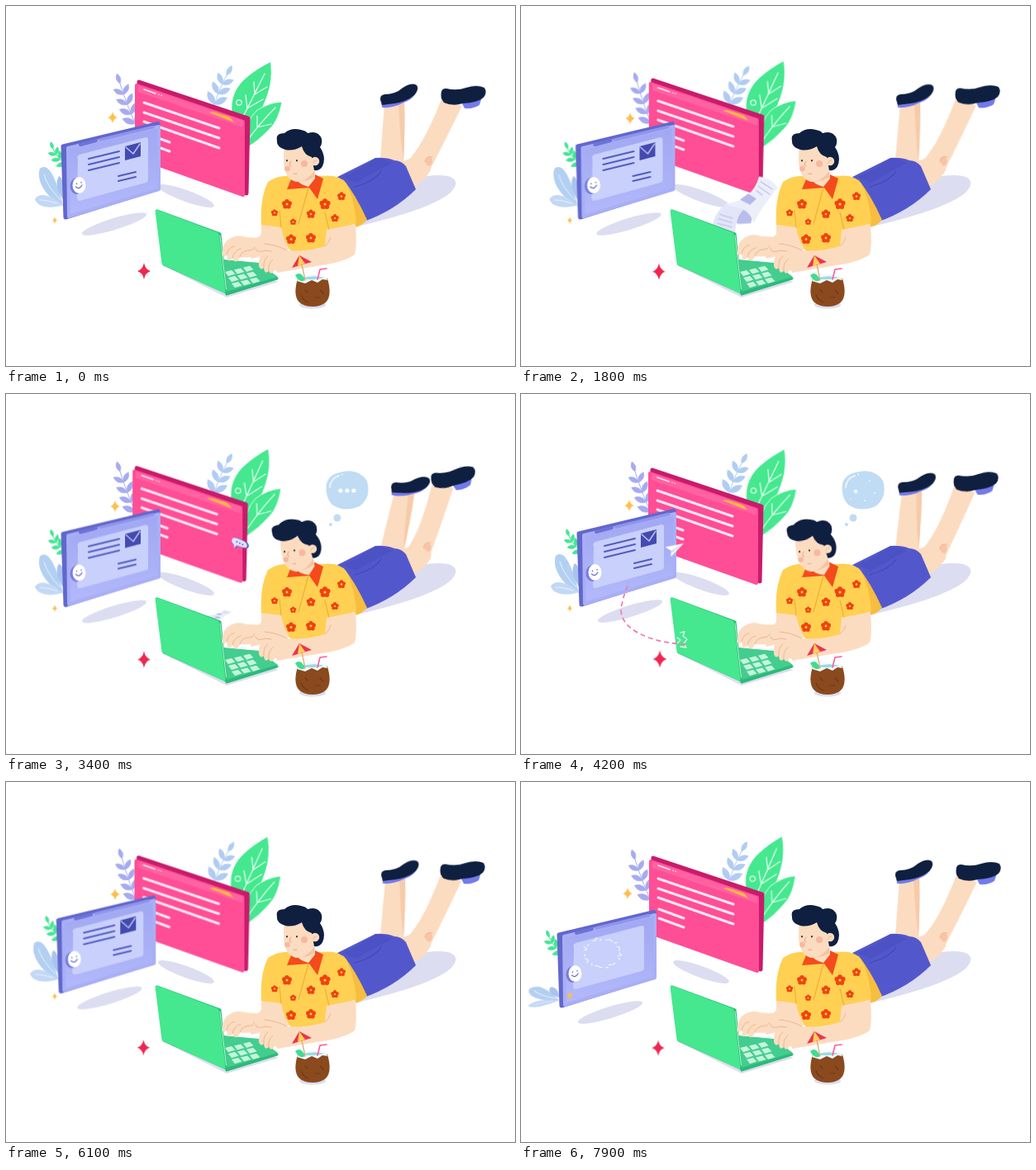
Recreate the animation shown at these times as an HTML page. Size 616 px wide and 436 px high, loop 8000 ms.

```html
<!DOCTYPE html>
<html lang="en">
<head>
<meta charset="utf-8">
<title>Working on the floor</title>
<style>
html, body { margin: 0; width: 100%; height: 100%; overflow: hidden; background: #fff; }
svg { display: block; width: 616px; height: 436px; }
.a { animation: 8s ease-in-out infinite; }

/* legs */
.leg { animation: 1s cubic-bezier(.37, 0, .63, 1) -50ms infinite alternate; }
#legBack { transform-origin: 465px 190px; animation-name: kickBack; }
#legFront { transform-origin: 492px 198px; animation-name: kickFront; }
@keyframes kickBack { to { transform: rotate(17deg); } }
@keyframes kickFront { to { transform: rotate(-13deg); } }

/* head and hands */
#head { transform-origin: 357px 212px; animation-name: nod; }
@keyframes nod {
  0%, 24%, 62%, 100% { transform: none; }
  29%, 57% { transform: translate(0, 1.5px) rotate(-7deg); }
}
#handA { animation: tap .2s ease-in-out infinite alternate; }
@keyframes tap { to { transform: translateY(-1.2px); } }
#handB { transform-origin: 334px 308px; animation-name: lift; }
@keyframes lift {
  0%, 29%, 36%, 100% { transform: none; }
  31.5%, 33.5% { transform: translate(7px, -2px) rotate(14deg); }
}

/* panels */
#pink { animation-name: pink; }
@keyframes pink {
  0%, 5% { transform: none; }
  11.25% { transform: translate(1px, -1px); }
  32.5%, 38% { transform: translate(-3px, -3px); }
  52.5% { transform: translate(-2px, 0); }
  66.25% { transform: translate(0, -1px); }
  86.25%, 100% { transform: translate(-1px, 0); }
}
#blue { animation-name: blue; }
@keyframes blue {
  0%, 11.25% { transform: none; }
  32.5% { transform: translate(-1px, 0); }
  52.5% { transform: translate(1px, -1px); }
  64% { transform: none; }
  66.25%, 70% { transform: translate(-6px, -4px); }
  86.25% { transform: translate(-5px, 1px); }
  91% { transform: translate(-26px, 16px); }
  95%, 100% { transform: translate(-23px, 15px); }
}
#plant { transform-origin: 68px 240px; animation-name: plant; }
@keyframes plant {
  0%, 64%, 82% { transform: none; }
  68% { transform: rotate(-5deg); }
  87% { transform: rotate(-8deg); }
  91%, 100% { transform: translate(0, 9px) rotate(-16deg) scale(1.12, .52); }
}
#mail { animation-name: mail; }
@keyframes mail { 0%, 87% { opacity: 1; } 91%, 100% { opacity: 0; } }
#ring { transform-origin: 126px 199px; animation-name: ring; }
@keyframes ring {
  0%, 81% { opacity: 0; transform: scale(.2); }
  83%, 87% { opacity: 1; transform: none; }
  98.75%, 100% { opacity: 1; transform: translate(-5px, -7px) scale(.7, .5); }
}
#chip { animation-name: chip; }
@keyframes chip {
  0%, 88% { opacity: 0; }
  91%, 100% { opacity: 1; }
}

/* leaves and stars */
#leaves { transform-origin: 285px 150px; animation-name: leaves; }
@keyframes leaves {
  0%, 11.25% { transform: none; }
  32.5% { transform: rotate(-3deg); }
  52.5% { transform: rotate(-1deg); }
  66.25% { transform: rotate(-4deg); }
  86.25% { transform: rotate(-1deg); }
  98.75%, 100% { transform: rotate(-3deg); }
}
#fernA, #fernB { transform-origin: 160px 150px; animation-name: fern; }
#fernB { transform-origin: 250px 126px; }
@keyframes fern {
  0%, 40%, 98.75%, 100% { transform: none; }
  11.25%, 86.25% { transform: rotate(1.5deg); }
  32.5%, 66.25% { transform: translate(1px, -1px) rotate(2.5deg); }
  52.5% { transform: none; }
}
#gold { animation-name: gold; }
@keyframes gold {
  0%, 100% { transform: none; }
  11.25%, 52.5%, 86.25% { transform: translateX(2px); }
  32.5%, 66.25% { transform: translate(4px, 2px); }
}
#red { transform-origin: 167px 321px; animation-name: red; }
@keyframes red {
  0%, 100% { transform: none; }
  11.25%, 52.5% { transform: translateX(1px) scale(1.05); }
  32.5%, 86.25%, 98.75% { transform: translate(-1px, 1px) scale(.94); }
}

/* messages */
#paper { transform-origin: 245px 274px; animation-name: paper; }
@keyframes paper {
  0%, 4% { transform: scale(.3, 0); }
  10%, 11.25% { transform: none; }
  16%, 39% { transform: scaleY(.9); }
  44%, 100% { transform: scale(.3, 0); }
}
#chat { transform-origin: 277px 187px; animation-name: chat; }
@keyframes chat {
  0%, 25%, 44%, 100% { transform: scale(0); }
  28%, 41% { transform: none; }
}
#think { transform-origin: 388px 156px; animation-name: think; }
@keyframes think {
  0%, 26% { transform: scale(0); }
  30%, 35% { transform: none; }
  52.5%, 58% { transform: translate(2px, 0); }
  60% { transform: scale(1.06); opacity: 1; }
  65%, 100% { transform: scale(.3); opacity: .5; }
  67%, 100% { transform: scale(0); opacity: 0; }
}
#dotA { animation-name: dotA; }
#dotB { animation-name: dotB; }
#dotC { animation-name: dotC; }
@keyframes dotA { 0%, 34%, 47%, 100% { opacity: 0; } 35%, 46% { opacity: 1; } }
@keyframes dotB { 0%, 31%, 47%, 100% { opacity: 0; } 32%, 46% { opacity: 1; } }
@keyframes dotC { 0%, 30%, 47%, 100% { opacity: 0; } 31%, 46% { opacity: 1; } }
#bead { animation-name: bead; }
@keyframes bead { 0%, 47%, 100% { opacity: 0; } 49%, 99% { opacity: 1; } }

/* paper plane and its trails */
#plane { animation-name: plane; animation-timing-function: linear; }
@keyframes plane {
  0%, 46% { transform: translate(196px, 300px) rotate(-180deg) scale(0); }
  48.5% { transform: translate(150px, 295px) rotate(-165deg) scale(.8); }
  50.5% { transform: translate(122px, 258px) rotate(-85deg) scale(.8); }
  52.5% { transform: translate(186px, 187px) rotate(-30deg) scale(.8); }
  58% { transform: translate(405px, 122px) rotate(-15deg) scale(.8); }
  59% { transform: translate(425px, 130px) rotate(60deg) scale(.8); }
  61% { transform: translate(420px, 148px) rotate(145deg) scale(.9); }
  63.5% { transform: translate(280px, 225px) rotate(165deg); }
  66.25% { transform: translate(139px, 207px) rotate(197deg); }
  69%, 100% { transform: translate(100px, 192px) rotate(200deg) scale(0); }
}
.wipe { fill: none; stroke: #fff; stroke-width: 8; stroke-dasharray: 1 1.1; animation-timing-function: linear; }
#wipeA { animation-name: wipeA; }
#wipeB { animation-name: wipeB; }
@keyframes wipeA {
  0%, 46.5% { stroke-dashoffset: 1.05; }
  51.5%, 53.5% { stroke-dashoffset: 0; }
  57%, 100% { stroke-dashoffset: -1.05; }
}
@keyframes wipeB {
  0%, 61% { stroke-dashoffset: 1.05; }
  65.5%, 67% { stroke-dashoffset: 0; }
  71%, 100% { stroke-dashoffset: -1.05; }
}
#spark { animation-name: spark; }
@keyframes spark { 0%, 46%, 55%, 100% { opacity: 0; } 48%, 53% { opacity: 1; } }

.line { fill: none; stroke-linecap: round; stroke-linejoin: round; }
.skin { fill: #fcdcc0; }
.crease { stroke: #eab592; stroke-width: 1; }
</style>
</head>
<body>
<svg viewBox="0 0 616 436">
<defs>
  <path id="star" d="M0-10Q1.5-2 8 0Q1.5 2 0 10Q-1.5 2-8 0Q-1.5-2 0-10Z"/>
  <g id="flower"></g>
  <path id="pathA" pathLength="1" d="M199 303C160 302 114 285 122 255Q125 240 131 228"/>
  <path id="pathB" pathLength="1" d="M422 147C360 195 260 255 180 222"/>
  <mask id="maskA" maskUnits="userSpaceOnUse" x="0" y="0" width="616" height="436"><use href="#pathA" class="a wipe" id="wipeA"/></mask>
  <mask id="maskB" maskUnits="userSpaceOnUse" x="0" y="0" width="616" height="436"><use href="#pathB" class="a wipe" id="wipeB"/></mask>
  <linearGradient id="blueFill" x2="0" y2="1"><stop stop-color="#a1a7f1"/><stop offset="1" stop-color="#b3b9fb"/></linearGradient>
</defs>

<g fill="#dcddf0">
  <ellipse cx="218" cy="230" rx="36" ry="7" transform="rotate(20 218 230)"/>
  <path d="M425 267L490 210Q515 203 535 206Q552 211 538 226Q515 246 425 267Z"/>
  <path d="M189 314L267 353L330 334L300 325Z"/>
  <ellipse cx="371" cy="362" rx="16" ry="4.5"/>
</g>

<g class="a" id="fernA" fill="#a6abf0" stroke="#a6abf0"></g>
<g class="a" id="fernB" fill="#b0ccf3" stroke="#b0ccf3"></g>
<g class="a" id="leaves">
  <path fill="#45e88f" d="M277 145Q265 108 292 86Q304 76 320 68Q323 90 315 111Q308 131 293 147Z"/>
  <path class="line" stroke="#e4fff0" stroke-width="1.3" d="M283 142Q298 112 313 82M292 124L290 108M301 107L300 92M292 124L311 113M301 107L316 98"/>
  <path fill="#45e88f" stroke="#fff" stroke-width=".8" d="M287 172Q288 141 303 127Q317 117 334 116Q330 139 318 150Q306 163 291 172Z"/>
  <path class="line" stroke="#e4fff0" stroke-width="1.2" d="M292 163Q308 141 326 123M304 147L304 133M304 147L321 143"/>
  <circle cx="282" cy="117" r="3.2" fill="none" stroke="#e4fff0" stroke-width="1.2"/>
</g>

<g class="a" id="pink" stroke-linejoin="round">
  <path fill="#c91b6b" stroke="#c91b6b" stroke-width="5" d="M161 92L293 136L291 227L161 178Z"/>
  <path fill="#ff4e96" stroke="#ff4e96" stroke-width="4" d="M158 96L287 140L287 229L158 183Z"/>
  <path fill="#ff62a1" d="M160 96L287 139V147L160 104Z"/>
  <path fill="#ffb547" d="M246 129Q250 127 257 130L270 134Q274 137 276 141Z"/>
  <path class="line" stroke="#ffe6f1" stroke-width="1.6" d="M167 101L181 106M185 107.2h.1M188 108.2h.1"/>
  <path class="line" stroke="#ffe6f1" stroke-width="3" d="M167 117L258 148M167 129L258 160M167 140L258 172M168 154L198 165M168 165L198 176"/>
</g>

<g class="a" id="blue" stroke-linejoin="round">
  <ellipse cx="131" cy="264" rx="41" ry="7" transform="rotate(-17 131 264)" fill="#dcddf0"/>
  <g id="sprig" fill="#45e694" stroke="#45e694"></g>
  <g class="a" id="plant" fill="#b3d0f2">
    <path d="M69 242C48 232 36 211 41 197C51 189 60 206 69 242Z"/>
    <path fill="#c3d8f5" d="M69 241C54 246 38 244 35 234C40 224 57 230 69 241Z"/>
    <path fill="#a8c4ee" d="M70 236Q57 217 64 206Q72 210 70 236Z"/>
    <path class="line" stroke="#e9f1fd" d="M66 235Q50 219 46 204M62 239Q50 235 41 235"/>
  </g>
  <path fill="#6267cd" stroke="#6267cd" stroke-width="5" d="M69 170L184 142.500L184 221L72 256Z"/>
  <path fill="url(#blueFill)" stroke="#a9aff5" stroke-width="4" d="M75 172L185 146L185 222L76 255Z"/>
  <path fill="#c8d0fb" d="M87 186Q85 182 89 180L169 159Q172 159 172 162V210Q172 213 169 214L89 236Q86 236 86 232Z"/>
  <path class="line" stroke="#6d73d8" stroke-width="4" d="M90 168L109 163"/>
  <path class="line" stroke="#8f95ec" stroke-width="3.500" d="M114 162L178 146.500"/>
  <g class="a" id="mail">
    <path fill="#444aae" d="M144 170L163 165V182L144 187Z"/>
    <path class="line" stroke="#b9c0fa" stroke-width="1.5" d="M145 171L154 179L162 167"/>
    <path class="line" stroke="#555bc0" stroke-width="2" d="M100 185L137 176M100 192L137 183M100 199L137 190M136 206L157 201M136 212L157 207"/>
  </g>
  <path class="a line" id="ring" stroke="#fff" stroke-width="1.6" stroke-dasharray="14 6 5 12"/>
  <circle class="a" id="chip" cx="82" cy="243" r="2.5" fill="#ffc04a"/>
  <ellipse cx="85.500" cy="218" rx="8" ry="10" fill="#767ce0"/>
  <ellipse cx="88.500" cy="217" rx="8" ry="10" fill="#fff"/>
  <path class="line" stroke="#6d73d8" stroke-width="1.4" d="M85.500 215v.5M91 213.500v.5M84.500 219Q88.500 223 92 217"/>
</g>

<g fill="#ffbd4a">
  <g class="a" id="gold"><use href="#star" transform="translate(129 135) scale(.72)"/></g>
  <use href="#star" transform="translate(59 259.500) scale(.4)"/>
</g>
<use href="#star" class="a" id="red" x="167" y="321" fill="#ef2650"/>

<g class="a" id="paper">
  <path fill="#b9bdeb" d="M252 238Q272 234 283 244L278 262L262 263Z"/>
  <path fill="#e3e5f8" d="M230 274Q235 238 255 234L276 240Q261 245 259 274Z"/>
  <path fill="#eceefa" d="M246 236Q281 231 288 199Q302 200 311 214Q297 231 281 262Q278 245 262 241Z"/>
  <path class="line" stroke="#b8bce9" stroke-width="1.2" d="M290 206L304 216M287 212L301 223M285 218L292 224M241 250L256 255M239 256L255 261M238 262L255 267"/>
  <path fill="#b3b8ed" d="M265 230L275 222L285 229L277 237Z"/>
</g>

<g stroke-linejoin="round">
  <path fill="#2cba78" stroke="#2cba78" stroke-width="3" d="M264 309L305 313L328 330L267 349Z"/>
  <path fill="#43cd8e" d="M262 307L306 311L329 328L267 346Z"/>
  <g id="keys" fill="#c5f5dc"></g>
  <path fill="#2cbf76" stroke="#2cbf76" stroke-width="3" d="M183 248L259 276L266 347L191 313Z"/>
  <path fill="#45e88f" stroke="#45e88f" stroke-width="3" d="M182 248L256 276L264 346L190 312Z"/>
  <path class="line" stroke="#b9f5d4" d="M259 278L266.500 343"/>
  <path class="a line" id="spark" stroke="#d8ffe9" stroke-width="1.3" d="M193 289L198 288L196 293L201 297L197 302L200 307L193 306M189 295L193 298L189 302"/>
</g>

<g class="leg" id="legBack">
  <path class="skin" d="M458 118L482 116Q483 150 481 190L474 202H452Q455 155 458 118Z"/>
  <path fill="#f6cba9" d="M475 120L482 117Q483 150 481 188Q477 160 475 120Z"/>
  <path fill="#747aeb" d="M454 115L455 123Q468 124 481 117Q490 114 494 108Z"/>
  <path fill="#0e1f40" d="M453 114Q452 108 458 107Q471 107 480 99Q491 92 497 96Q500 101 494 108Q484 116 470 118L455 120Z"/>
</g>
<path class="skin" d="M474 190L507 179Q517 190 514 199Q508 210 494 219L470 225Z"/>
<g class="leg" id="legFront">
  <path class="skin" d="M527 113L552 121Q533 160 518 189Q510 207 495 216L478 194Q501 180 527 113Z"/>
  <ellipse cx="512" cy="188" rx="4" ry="5.500" fill="#f8c3a8"/>
  <path class="line crease" d="M516 183Q507 181 507 189"/>
  <path fill="#747aeb" d="M551 116L555 124Q566 125 573 120L576 111Z"/>
  <path fill="#0e1f40" d="M527 112Q525 99 533 100Q546 103 557 99Q570 95 579 99Q583 105 578 111Q571 117 553 118Q541 122 530 117Z"/>
</g>

<path fill="#5258cc" d="M401 207L447 184Q460 183 470 187Q478 187 484 194L496 222Q470 248 433 261Q415 236 401 207Z"/>
<path fill="#454ab4" d="M447 184Q458 184 467 190L423 214L407 207Q428 199 447 184Z" opacity=".4"/>
<path class="line" stroke="#4247ad" stroke-width="1.200" d="M422 219Q445 213 454 200"/>
<path fill="#f7bd3f" d="M408 210Q423 228 437 259Q431 266 422 268Z"/>

<path class="skin" d="M309 262L335 266L346 294L297 306L285 282Q305 284 309 276Z"/>
<g id="handA">
  <path class="skin" d="M311 281L291 280Q280 276 272 281Q261 286 262 302Q264 306 267 301L268 307Q270 311 274 305L276 309Q281 311 283 304Q296 306 311 300Z"/>
  <path class="line crease" d="M267 301Q269 292 276 291M274 305Q276 296 284 294M283 304Q284 298 292 296Q298 297 301 292"/>
</g>
<path fill="#ffd052" d="M317 213Q330 204 346 206H380Q404 203 412 215Q422 235 424 263Q407 270 391 271Q391 283 386 291Q366 301 345 297Q336 285 333 268L309 265Q307 233 317 213Z"/>
<path class="line" stroke="#edae35" stroke-width="1.100" d="M366 220L354 264M391 271L386 250M333 268L331 248"/>
<g id="flowers"></g>
<path class="skin" d="M388 271L423 264Q425 290 422 301Q410 310 382 314L328 323L318 293Q352 301 386 291Z"/>
<path class="line crease" d="M386 291Q392 286 393 280"/>
<g class="a" id="handB">
  <path class="skin" d="M340 296Q327 289 313 288Q301 289 302 294Q303 299 313 297Q305 302 306 315Q308 321 312 317Q313 326 318 321Q321 327 325 320L340 320Z"/>
  <path class="line crease" d="M302 294Q303 300 314 296L321 297M312 317Q311 307 317 303M318 321Q317 311 323 307M340 296Q327 289 313 288"/>
</g>

<path fill="#f54a1c" d="M347 205L340 222L367 220L377 234L384 209L374 204Z"/>
<g class="a" id="head">
  <path class="skin" d="M350 200H374V209L366 219Q354 216 350 208Z"/>
  <path fill="#f3c4a2" d="M353 212Q366 210 373 200V207Q365 213 353 212Z"/>
  <path class="skin" d="M337 168Q335 185 337 197Q340 210 351 213Q364 213 373 199L376 168Z"/>
  <path fill="#0e1f40" d="M338 174Q327 171 328 163Q326 154 337 154Q345 147 357 150Q363 151 365 154Q378 150 382 161Q383 167 380 171Q388 183 383 194Q380 200 373 199L370 183Q361 181 358 170Q348 176 338 174Z"/>
  <circle class="skin" cx="374" cy="188" r="5.200"/>
  <path class="line crease" d="M372 190Q372 186 376 187"/>
  <circle cx="361" cy="191" r="4" fill="#f8b7a0"/>
  <circle cx="340.500" cy="197" r="3.300" fill="#f8b7a0"/>
  <path class="line" stroke="#0e1f40" stroke-width="1.800" d="M340 187v.4M352 187v.4"/>
  <path class="line" stroke="#e3a283" d="M345 188Q341 193 345 194M348 203Q350 204 352 203"/>
</g>

<g>
  <path fill="#8a4a1e" d="M353 330Q343 364 371 364Q399 364 389 330Q371 324 353 330Z"/>
  <path class="line" stroke="#6f3816" stroke-width="1.200" d="M357 350Q360 357 366 359M380 344L384 348M362 344L365 347M374 353L380 353"/>
  <path fill="#f5fbff" d="M352 333L355 327Q371 322 387 327L389 332L383 331L377 335L370 332L362 336Z"/>
  <path fill="#9adbe3" d="M357 330Q371 325 385 329Q372 333 357 330Z"/>
  <path fill="#3fdc91" d="M350 326Q357 320 362 332Q355 336 350 326Z"/>
  <path class="line" stroke="#d9b07c" stroke-width="1.300" d="M356 303L362 332"/>
  <path class="line" stroke="#ff5b9a" stroke-width="1.600" d="M377 331L380 319L388 318"/>
  <path fill="#f0304f" d="M355 302L346 317L370 310Z"/>
  <path fill="#ffd052" d="M355 302L353 315L362 312Z"/>
</g>

<g class="a" id="chat" stroke-linejoin="round">
  <g transform="translate(-2 0)">
    <path fill="#575cc0" stroke="#575cc0" stroke-width="3" d="M276 162Q281 159 306 172Q314 177 311 184Q308 188 294 182L284 179L280 186L279 177Q270 171 276 162Z"/>
    <path fill="#dfe3ff" stroke="#dfe3ff" d="M274 162Q277 158 302 170Q311 176 308 183Q306 187 292 182L283 179L278 186L277 177Q268 170 274 162Z"/>
    <path class="line" stroke="#4d53b9" stroke-width="3.500" d="M284 170.500v.1M291 174v.1M298 177.500v.1"/>
  </g>
</g>
<g class="a" id="think">
  <path fill="#c0dbf4" d="M387 119Q384 99 403 95Q425 89 436 105Q442 125 427 136Q408 144 394 134Q388 128 387 119Z"/>
  <circle cx="400" cy="150" r="4.500" fill="#c0dbf4"/>
  <circle cx="392" cy="158" r="2" fill="#c0dbf4"/>
  <path class="line" stroke="#e9f4fe" stroke-width="2" d="M391 113Q392 102 402 99M406 97.500h.1"/>
  <g fill="#fff">
    <circle class="a" id="dotA" cx="404" cy="117" r="2.600"/>
    <circle class="a" id="dotB" cx="412" cy="117" r="2.600"/>
    <circle class="a" id="dotC" cx="420" cy="117" r="2.600"/>
  </g>
  <g class="a" id="bead" fill="#e9f4fe">
    <circle cx="403" cy="118" r="2.500"/>
    <circle cx="420" cy="105" r="1"/><circle cx="426" cy="120" r="1"/><circle cx="414" cy="129" r="1"/><circle cx="397" cy="127" r=".8"/>
  </g>
</g>

<g fill="none" stroke="#ee7fae" stroke-width="1.800" stroke-dasharray="6 4">
  <g mask="url(#maskA)"><path d="M199 303C160 302 114 285 122 255Q125 240 131 228"/></g>
  <g mask="url(#maskB)"><path stroke="#d57aa8" d="M422 147C360 195 260 255 180 222"/></g>
</g>
<g class="a" id="plane">
  <path fill="#fff" d="M15 0L-12-9L-7 0L-12 8Z"/>
  <path fill="#d5d9f5" d="M15 0L-7 0L-9 4Z"/>
</g>
</svg>
<script>
const $ = id => document.getElementById(id);
const add = (id, html) => $(id).insertAdjacentHTML('beforeend', html);

// A stem along a quadratic curve with paired pointed leaves and one at the tip.
function fern(id, [x0, y0], [cx, cy], [x2, y2], pairs, size) {
  let out = `<path class="line" d="M${x0} ${y0}Q${cx} ${cy} ${x2} ${y2}"/>`;
  for (let i = 0; i <= pairs; i++) {
    const t = .15 + .85 * i / pairs, u = 1 - t;
    const x = u * u * x0 + 2 * u * t * cx + t * t * x2;
    const y = u * u * y0 + 2 * u * t * cy + t * t * y2;
    const dir = Math.atan2(u * (cy - y0) + t * (y2 - cy), u * (cx - x0) + t * (x2 - cx)) * 180 / Math.PI;
    const len = size * (2.2 - .6 * t), w = len * .42;
    for (const turn of i === pairs ? [0] : [-45, 45])
      out += `<path d="M0 0Q${len * .5} ${-w} ${len} 0Q${len * .5} ${w} 0 0Z" stroke-width=".6" transform="translate(${x} ${y}) rotate(${dir + turn})"/>`;
  }
  add(id, out);
}
fern('fernA', [160, 150], [148, 125], [138, 94], 4, 7.8);
fern('fernB', [250, 126], [257, 102], [267, 84], 3, 8.2);
fern('sprig', [76, 192], [62, 187], [57, 173], 3, 5.5);

let petals = '';
for (let i = 0; i < 5; i++) {
  const a = i * Math.PI * .4 - Math.PI / 2;
  petals += `<circle cx="${3.4 * Math.cos(a)}" cy="${3.4 * Math.sin(a)}" r="2.700"/>`;
}
add('flower', `<g fill="#f0430f">${petals}</g><circle r="1.400" fill="#ffd052"/>`);
const blooms = [[340, 240, 1], [386, 240, 1.1], [369, 252, .9], [325, 250.5, .7], [406, 230.5, .85],
  [347.5, 261.5, .65], [345, 282.5, 1], [369, 281, 1], [398, 257, .8]];
for (const [x, y, s] of blooms)
  add('flowers', `<use href="#flower" transform="translate(${x} ${y}) scale(${s})"/>`);

for (let r = 0; r < 3; r++)
  for (let c = 0; c < 3; c++)
    add('keys', `<path transform="translate(${265 + 11 * c + 4 * r} ${322 - 2.6 * c + 7 * r})" d="M0 0L8-2L12.500 2.500L4 5.200Z"/>`);

// Jagged ring of broken strokes.
let ring = '';
for (let i = 0; i <= 44; i++) {
  const a = i * Math.PI / 22, k = 1 + .09 * Math.sin(i * 2.3) + (i % 2 ? .04 : -.04);
  ring += `${i ? 'L' : 'M'}${(126 + 31 * k * Math.cos(a)).toFixed(1)} ${(199 + 34 * k * Math.sin(a)).toFixed(1)}`;
}
$('ring').setAttribute('d', ring);
</script>
</body>
</html>
```
